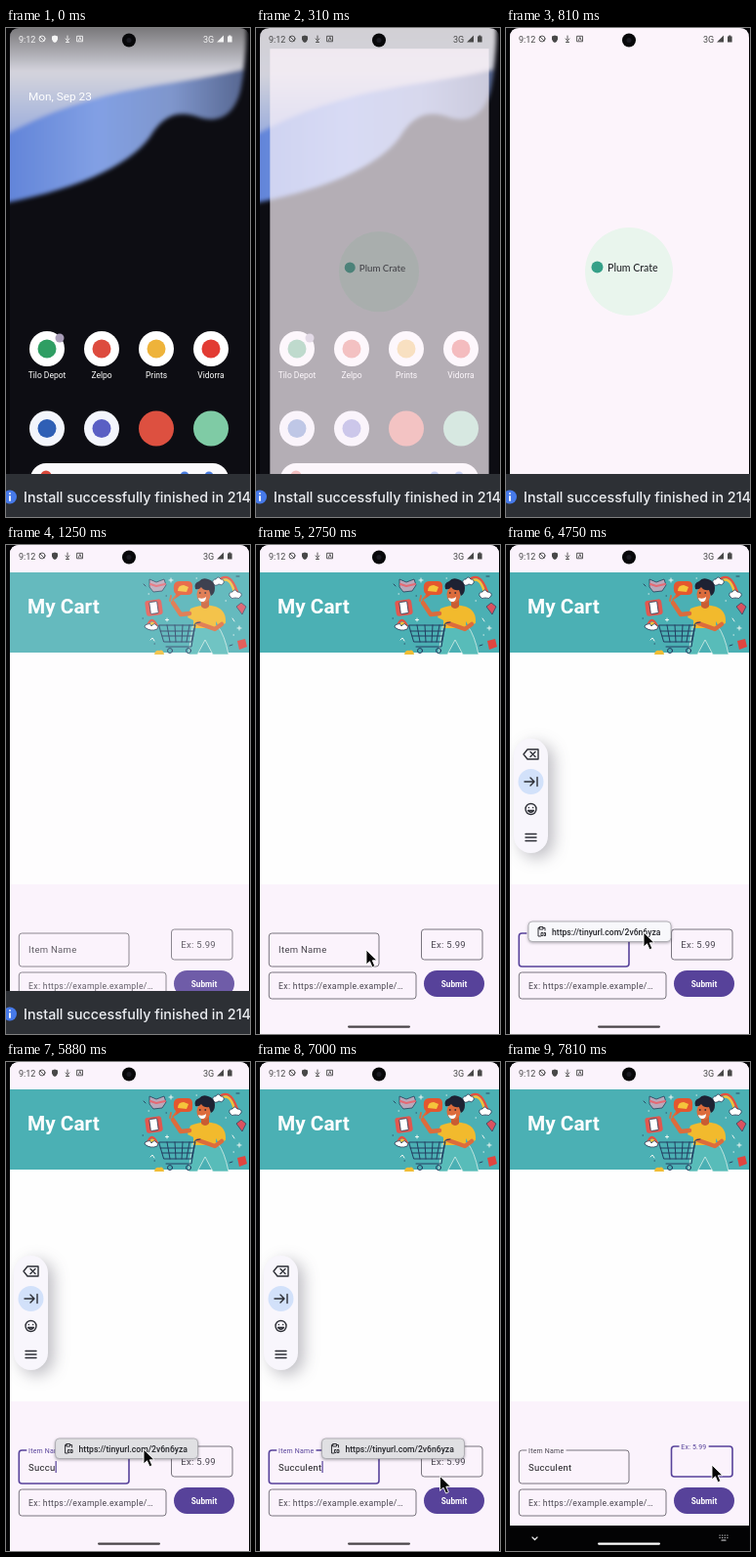
An HTML page that plays this animation: 250x500 px, repeating every 8 s.

```html
<!DOCTYPE html>
<html lang="en">
<head>
<meta charset="utf-8">
<title>My Cart</title>
<style>
html, body { margin: 0; width: 100%; height: 100%; overflow: hidden; background: #050507; }
svg { display: block; width: 250px; height: 500px; }
text { font-family: Roboto, sans-serif; white-space: pre; }
.mid { text-anchor: middle; }
.line { fill: none; stroke-linecap: round; stroke-linejoin: round; }
#pill { filter: drop-shadow(6px 5px 8px rgba(60, 55, 75, .32)); }
#chip { filter: drop-shadow(0 1px 1.5px rgba(40, 40, 50, .4)); }
</style>
</head>
<body>
<svg viewBox="0 0 250 500">
  <defs>
    <linearGradient id="blue" x1="0" y1="0" x2="1" y2="0">
      <stop offset="0" stop-color="#5f82d8"/><stop offset=".4" stop-color="#82a0e4"/>
      <stop offset=".7" stop-color="#7f96cc"/><stop offset="1" stop-color="#566690"/>
    </linearGradient>
    <linearGradient id="pale" x1="0" y1="0" x2="0" y2="1">
      <stop offset="0" stop-color="#d2cfd4"/><stop offset=".45" stop-color="#d3d3dc"/>
      <stop offset="1" stop-color="#98abdc"/>
    </linearGradient>
    <linearGradient id="shade" x1="0" y1="0" x2="0" y2="1">
      <stop offset="0" stop-color="#000" stop-opacity=".42"/><stop offset="1" stop-color="#000" stop-opacity="0"/>
    </linearGradient>
    <filter id="soft"><feGaussianBlur stdDeviation="2.2"/></filter>
    <clipPath id="screen"><path d="M4 10Q4 0 14 0H239Q249 0 249 10V500H4Z"/></clipPath>
    <clipPath id="art"><rect x="136" y="28" width="113" height="84"/></clipPath>
  </defs>
  <rect width="250" height="500" fill="#050507"/>

  <g clip-path="url(#screen)">
    <g id="home">
      <rect width="250" height="500" fill="#0d0d13"/>
      <g filter="url(#soft)">
        <path fill="url(#blue)" d="M-6-6H243Q247 30 242 55C238 85 222 98 200 92C178 84 164 88 151 106C134 136 80 164-6 180Z"/>
        <path fill="url(#pale)" d="M-6-6H246Q247 20 243 42C200 52 165 56 135 62C90 70 40 86-6 112Z"/>
      </g>
      <rect id="scrim" width="250" height="44" fill="url(#shade)"/>
      <text id="date" x="23" y="74" font-size="11.8" fill="#fff">Mon, Sep 23</text>
      <g id="apps"></g>
      <circle cx="55" cy="317" r="4.5" fill="#a99db8"/>
      <rect x="25" y="445" width="203" height="32" rx="16" fill="#fbfafc"/>
      <circle cx="41" cy="458" r="5.5" fill="#d9493c"/>
      <circle cx="183" cy="458" r="4.5" fill="#4a7de0"/>
      <circle cx="208" cy="458" r="4.5" fill="#4a7de0"/>
    </g>

    <g id="splash">
      <rect x="4" width="245" height="500" fill="#fcf4fb"/>
      <g id="brand">
        <circle cx="126" cy="249" r="45" fill="#e9f5ed"/>
        <circle cx="93.5" cy="244.5" r="6" fill="#35a088"/>
        <text x="104" y="248.5" font-size="10.6" font-weight="500" fill="#26282c" style="font-family:Lato,sans-serif">Plum Crate</text>
      </g>
    </g>

    <g id="app">
      <rect width="250" height="500" fill="#fbf3fc"/>
      <rect y="110" width="250" height="237" fill="#fefefe"/>
      <rect y="28" width="250" height="82" fill="#4bb0b4"/>
      <text x="22" y="70" font-size="20.8" font-weight="700" fill="#fff">My Cart</text>

      <g clip-path="url(#art)">
        <g class="line" stroke-width="2.4">
          <path d="M217 37Q229 25 237 48" stroke="#e4503f"/>
          <path d="M219 38Q229 30 234 48" stroke="#f4c33a"/>
          <path d="M145 83Q149 71 155 83" stroke="#e4503f"/>
          <path d="M147 84Q150 76 153 84" stroke="#f4c33a"/>
        </g>
        <g fill="#fff" stroke="#263a55" stroke-width=".8">
          <path d="M212 39q-1-4 3-4q2-4 5 0q4 0 3 4q-2 3-5 1q-4 3-6-1Z"/>
          <path d="M229 52q-1-4 3-4q2-4 5 0q5 0 4 4q-2 4-6 2q-4 2-6-2Z"/>
          <path d="M142 84q0-3 3-3q3-2 4 2q3-4 5-1q3 1 1 4q-7 3-13-2Z"/>
        </g>
        <path d="M147 35l7 3 8-3 2 6-4 6-9 1-4-5Z" fill="#b9a9bb" stroke="#26405a" stroke-width=".8"/>
        <path d="M148 40l6 2 9-2" class="line" stroke="#e56a74" stroke-width="2"/>
        <path d="M172 41q1-4 6-4h8q5 0 5 5v5q0 4-5 4h-7l-6 4 1-5q-3-2-2-9Z" fill="#e4572f"/>
        <path d="M176 47q0-6 6-6l5 2-2 5Z" fill="#f5c43b"/>
        <g transform="rotate(-8 152 64)">
          <rect x="143" y="56" width="17" height="16" rx="3" fill="#e2574f"/>
          <rect x="147.500" y="58" width="8" height="12" rx="1" fill="#fff" stroke="#2b3b55" stroke-width=".8"/>
        </g>
        <path d="M236 63l5-4 5 4-4 8Z" fill="#d95260" stroke="#26405a" stroke-width=".7"/>
        <path d="M237 98l8-2 2 8-8 3Z" fill="#e0453f"/>
        <path d="M152 112q1-5 5-4q4-2 5 4Z" fill="#f0bd35"/>
        <path d="M191 83H217Q224 92 228 112H212L204 97 196 112H187Z" fill="#58bcb9" stroke="#d8efe9" stroke-width=".8"/>
        <path d="M189 65Q203 59 215 63Q226 67 225 80L218 83 215 78V85H192V77L186 74Z" fill="#f2ba2d"/>
        <g class="line" stroke="#dc6c3c" stroke-width="4.500">
          <path d="M188 70L179 71 171 59"/><path d="M221 81L214 86 197 80"/>
        </g>
        <path d="M168 57l1-5m2 4l3-4" class="line" stroke="#dc6c3c" stroke-width="1.800"/>
        <path d="M200 56h8v7q-4 4-8 0Z" fill="#c95c32"/>
        <ellipse cx="202.500" cy="50.500" rx="7" ry="8.500" fill="#dc6c3c"/>
        <path d="M194 45q-2-6 4-8q3-4 9-2q7 2 7 9q0 6-4 8l-2-6q-5 1-8-3q-2 3-6 2Z" fill="#1e2233"/>
        <path d="M197 54q5 2 8-1q0 5-4 5q-3 0-4-4Z" fill="#fff"/>
        <path d="M198.500 49h.5m5 0h.5" class="line" stroke="#1e2233" stroke-width="1.400"/>
        <g class="line" stroke="#233d61" stroke-width="1">
          <path d="M199 79l-5 1-4 24H164M157 82H194L190 99H162ZM158 88H193M160 93H192M165 82l3 17m5-17l1 17m7-17l-1 17m8-17l-3 17"/>
          <circle cx="168" cy="108" r="2.500"/><circle cx="187" cy="108" r="2.500"/>
        </g>
        <path d="M169 34v4m-2-2h4M146 50h.5M165 75v3m-1.500-1.500h3M232 75l2 3M225 57h.5M239 83v4m-2-2h4M148 97l2-2 2 3M233 92h.5M195 34h.5" class="line" stroke="#eef6f1" stroke-width="1"/>
        <path d="M141 40l2 2M164 52h.5M140 75h.5M236 32h3M229 103l3-1M152 101h.5" class="line" stroke="#2b4661" stroke-width="1"/>
      </g>

      <g id="fields"></g>
      <rect x="172" y="435" width="62" height="27" rx="13.500" fill="#57429a"/>
      <text x="203" y="451.500" class="mid" font-size="8.300" font-weight="700" fill="#fff">Submit</text>
      <text id="typed" x="23" y="417.500" font-size="9.500" letter-spacing=".3" fill="#1d1b20"></text>
      <rect id="caret" y="408" width="1.200" height="12" fill="#57429a"/>

      <g id="pill">
        <rect x="8" y="198" width="35" height="117" rx="17.500" fill="#f8f6fc"/>
        <circle cx="25.500" cy="242" r="13" fill="#d2e1fa"/>
        <g class="line" stroke="#2d2f36" stroke-width="1.400">
          <path d="M18 214l4-5H33V219H22ZM25 211.500l5 5m0-5l-5 5"/>
          <path d="M19 242H29m-4-4l4 4-4 4M32 237.500v9"/>
          <circle cx="25.500" cy="270" r="5.500"/>
          <path d="M23.300 268.500h.1m4.200 0h.1M22.500 271.500q3 3.500 6 0Z"/>
          <path d="M20 295.500H31M20 299H31M20 302.500H31"/>
        </g>
      </g>

      <rect x="94" y="491.500" width="64" height="2.200" rx="1.100" fill="#4a4549"/>
      <g id="bar">
        <rect y="474" width="250" height="26" fill="#030304"/>
        <rect x="94" y="491.500" width="64" height="2.200" rx="1.100" fill="#fff"/>
        <g class="line" stroke="#e8e8ea" stroke-width="1.200">
          <path d="M27 486l2.500 2.500 2.500-2.500"/>
          <path d="M219 484h.2m2.400 0h.2m2.400 0h.2m2.400 0h.2M219 486.500h.2m2.400 0h.2m2.400 0h.2m2.400 0h.2M221 489h4"/>
        </g>
      </g>

      <g id="chip">
        <rect id="chipBox" x=".5" y="385" width="146" height="20.500" rx="4" stroke="#a5a4aa" stroke-width=".8"/>
        <path d="M12 391.500H10.500V400H13M15.500 391.500H17.500V394M12 390.500h3.500v2.500H12ZM15 396.500h-1.500v3h1.500m1.500-3H18v3h-1.500M15 398h2" class="line" stroke="#303136" stroke-width="1"/>
        <text x="24.500" y="398.500" font-size="8.600" font-weight="500" fill="#24252a">https://tinyurl.com/2v6n6yza</text>
      </g>
    </g>

    <g id="status" font-size="9">
      <text x="13" y="14.500">9:12</text>
      <g class="line" stroke="currentColor" stroke-width=".9">
        <circle cx="37" cy="11" r="3"/><path d="M35 9l4 4"/>
        <path d="M63 8v3M61 11q2 3 4 0M63 12.500v2M61.500 14.500h3"/>
        <rect x="73" y="8.300" width="5.500" height="5.500"/>
        <path d="M74.500 12.500l1.300-3 1.300 3"/>
      </g>
      <path d="M50 7.500l3 1v3q-.5 2.500-3 3.500q-2.500-1-3-3.500v-3Z"/>
      <text x="202" y="14.500">3G</text>
      <path d="M216 14.500h7v-7ZM227 8.500h1.300v-1h2v1h1.300v6H227Z"/>
    </g>
  </g>

  <circle cx="126" cy="12.500" r="7" fill="#08080a"/>
  <circle cx="126" cy="12.500" r="2.500" fill="#1b1b22"/>

  <g id="toast">
    <rect y="456" width="250" height="44" fill="#2d3035"/>
    <circle cx="4" cy="479.500" r="7" fill="#4679e8"/>
    <path d="M4 479v4M4 475.800v.2" class="line" stroke="#fff" stroke-width="1.800"/>
    <text x="18" y="485" font-size="14.300" font-weight="500" fill="#eceef2" style="font-family:Inter,sans-serif">Install successfully finished in 214 ms</text>
  </g>
  <path id="mouse" d="M0 0V15l3.500-3.200 2.600 5.900 2.700-1.200-2.500-5.700H11Z" fill="#060606" stroke="#fff" stroke-width=".9"/>
</svg>

<script>
const LOOP = 8000, PURPLE = '#57429a', GREY = '#79747e', INK = '#49454f';
const $ = id => document.getElementById(id);
const clamp = v => Math.min(1, Math.max(0, v));
const ramp = (t, a, b) => clamp((t - a) / (b - a));
const out = p => 1 - (1 - p) ** 2;
const smooth = p => p * p * (3 - 2 * p);
const mix = (a, b, p) => a + (b - a) * p;
const within = (t, a, b) => t >= a && t < b;

function add(parent, tag, attrs, text) {
  const el = document.createElementNS('http://www.w3.org/2000/svg', tag);
  set(el, attrs);
  if (text) el.textContent = text;
  return parent.appendChild(el);
}
function set(el, attrs) {
  for (const k in attrs) el.setAttribute(k, attrs[k]);
}

// launcher: column, row, disc, inner dot, label
[
  [0, 0, '#fff', '#2f9e63', 'Tilo Depot'],
  [1, 0, '#fff', '#dd4b3e', 'Zelpo'],
  [2, 0, '#fff', '#eeb33a', 'Prints'],
  [3, 0, '#fff', '#e23b33', 'Vidorra'],
  [0, 1, '#f3f5fc', '#2f5fb5'],
  [1, 1, '#f3f5fc', '#5a5fc4'],
  [2, 1, '#dd5040'],
  [3, 1, '#7fcba5']
].forEach(([col, row, disc, dot, label]) => {
  const cx = 42 + 56 * col, cy = 328 + 81.5 * row;
  add($('apps'), 'circle', { cx, cy, r: 18, fill: disc });
  if (dot) add($('apps'), 'circle', { cx, cy, r: 9.5, fill: dot });
  if (label) add($('apps'), 'text', { x: cx, y: 358, class: 'mid', 'font-size': 8.5, fill: '#fff' }, label);
});

function field(x, y, w, h, label, size = 9.5) {
  const g = $('fields');
  const box = add(g, 'rect', { x, y, width: w, height: h, rx: 3, fill: 'none' });
  const gap = add(g, 'rect', { x: x + 8, y: y - 1.5, height: 3, fill: '#fbf3fc' });
  const text = add(g, 'text', { x: x + 9.8 });
  text.textContent = label;
  const rest = y + h / 2 + size * .36;
  return (up, focus) => {
    set(box, { stroke: focus ? PURPLE : GREY, 'stroke-width': focus ? 1.6 : 1 });
    set(text, {
      y: mix(rest, y + 2.7, up), 'font-size': mix(size, 7, up),
      'letter-spacing': mix(.3, .2, up), fill: focus ? PURPLE : INK
    });
    set(gap, { width: up > .5 ? text.getComputedTextLength() + 4 : 0 });
  };
}
const item = field(13.3, 397, 112.7, 34, 'Item Name');
const price = field(169.5, 393, 62.5, 31, 'Ex: 5.99');
field(13.3, 437, 150.7, 27, 'Ex: https://example.example/…', 8.7)(0, false);

const WORD = 'Succulent';
const KEYS = [4810, 5010, 5310, 5450, 5620, 5990, 6400, 6530, 6680];
$('typed').textContent = WORD;
const widths = [0, ...KEYS.map((_, i) => $('typed').getSubStringLength(0, i + 1))];

const MOUSE = [
  [2250, 252, 436], [2700, 113, 414], [3700, 113, 414], [4300, 141, 396],
  [6760, 141, 396], [7130, 207, 434], [7190, 207, 434], [7400, 211, 412]
];
function mouseAt(t) {
  const i = MOUSE.findIndex(k => k[0] > t);
  if (i < 0) return MOUSE[MOUSE.length - 1].slice(1);
  if (i === 0) return [-40, -40];
  const [t0, x0, y0] = MOUSE[i - 1], [t1, x1, y1] = MOUSE[i];
  const p = smooth(ramp(t, t0, t1));
  return [mix(x0, x1, p), mix(y0, y1, p)];
}

const FOCUS = 3400, NEXT = 7320;

function draw(t) {
  const open = ramp(t, 60, 560), s = mix(.83, 1, open);
  set($('splash'), {
    opacity: mix(open, out(open), .8),
    transform: `translate(126 250) scale(${s}) translate(-126 -250)`
  });
  set($('brand'), { opacity: ramp(t, 60, 400) * (1 - ramp(t, 850, 1100)) });
  set($('date'), { opacity: 1 - ramp(t, 60, 280) });
  set($('scrim'), { opacity: 1 - ramp(t, 60, 300) });
  set($('app'), { opacity: out(ramp(t, 850, 1500)) });
  const tone = Math.round(mix(245, 72, ramp(t, 120, 260)));
  set($('status'), { fill: `rgb(${tone},${tone},${tone})`, color: `rgb(${tone},${tone},${tone})` });
  set($('toast'), { opacity: 1 - ramp(t, 1630, 1940) });

  item(smooth(ramp(t, FOCUS, FOCUS + 150)), within(t, FOCUS, NEXT));
  price(smooth(ramp(t, NEXT, NEXT + 150)), t >= NEXT);

  const n = KEYS.filter(k => k <= t).length;
  $('typed').textContent = WORD.slice(0, n);
  const inPrice = t >= NEXT;
  const caretOn = within(t, FOCUS, 4250) || within(t, 4800, NEXT) || within(t, NEXT + 80, 7740);
  set($('caret'), { x: inPrice ? 179 : 23 + widths[n], y: inPrice ? 402 : 408, opacity: +caretOn });

  const slide = n ? mix(widths[n - 1], widths[n], out(ramp(t, KEYS[n - 1], KEYS[n - 1] + 80))) : 0;
  set($('chip'), {
    transform: `translate(${22.5 + slide} 0)`,
    opacity: ramp(t, 3800, 3950) * (1 - ramp(t, NEXT, NEXT + 80))
  });
  const shade = Math.round(mix(248, 224, ramp(t, 4780, 4900)));
  set($('chipBox'), { fill: `rgb(${shade},${shade},${shade + 3})` });

  set($('pill'), { opacity: ramp(t, 3800, 3980) * (1 - ramp(t, NEXT + 60, NEXT + 200)) });
  set($('bar'), { opacity: +(within(t, 3520, 3820) || t >= NEXT + 200) });
  set($('mouse'), { transform: `translate(${mouseAt(t)})` });
}

const start = performance.now();
function tick() {
  draw((performance.now() - start) % LOOP);
  requestAnimationFrame(tick);
}
tick();
</script>
</body>
</html>
```
